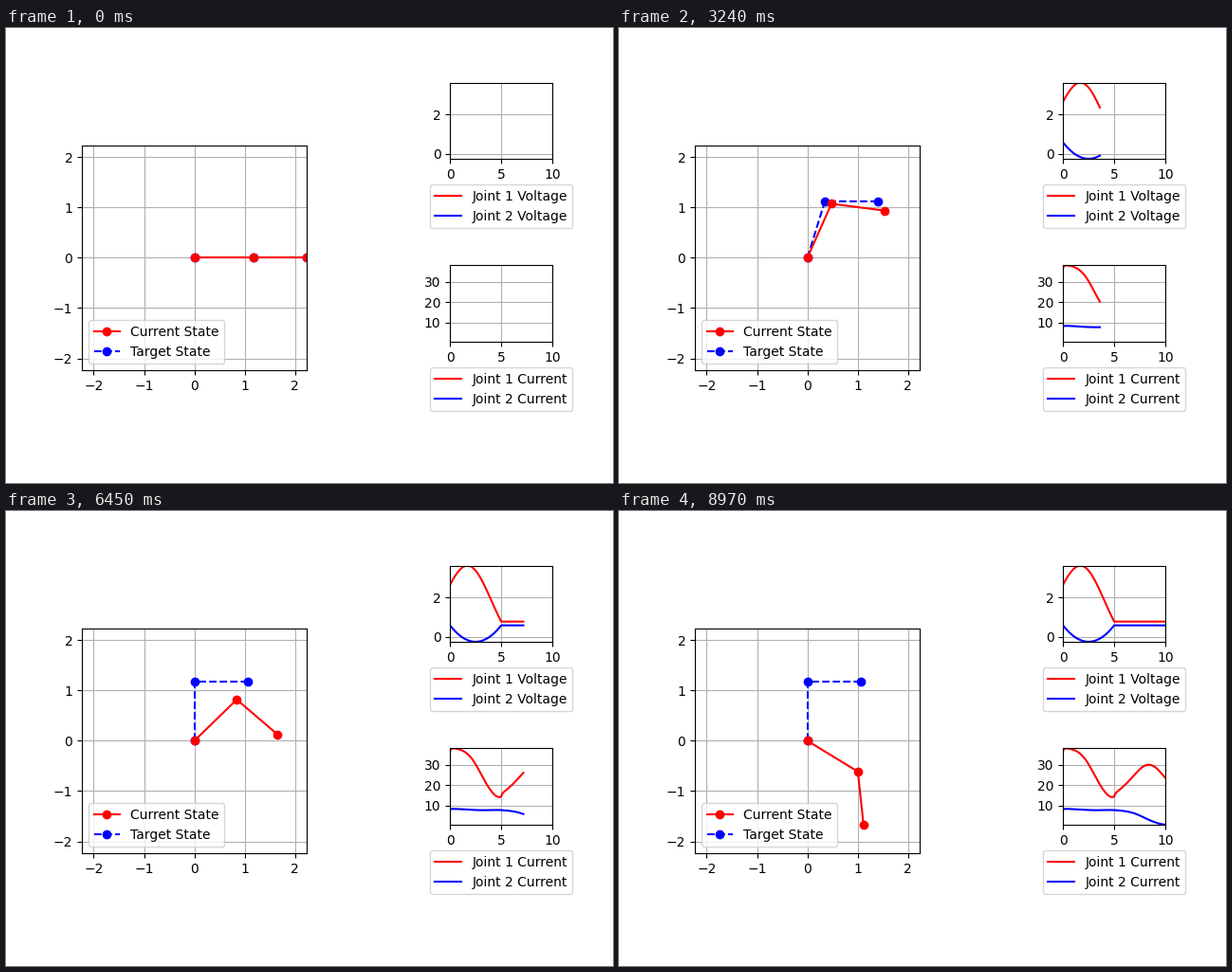
A matplotlib script that plays this animation: 640 by 480 pixels, repeating every 9000 ms.

```python
import numpy as np
import matplotlib.pyplot as plt
from matplotlib.animation import FuncAnimation
from matplotlib.gridspec import GridSpec

FRAMES, INTERVAL = 300, 30
T_END, T_MOVE = 10.0, 5.0
DT = T_END / FRAMES
L1, L2 = 1.175, 1.06
REACH = L1 + L2
R = 0.0725                          # winding resistance
K1, K2 = 2.7, 1.77                  # back-EMF constants
LOAD1, LOAD12, LOAD2 = 25.8, 10.75, 8.1   # gravity loads in amperes
INERTIA, COUPLING = 3.5, 1.0

t = np.arange(FRAMES) * DT

# Reference: cubic quarter turn of joint 1, joint 2 keeps link 2 level
s = np.clip(t / T_MOVE, 0, 1)
ref = np.pi / 2 * (3 * s ** 2 - 2 * s ** 3)
ref_rate = np.pi / 2 * 6 * s * (1 - s) / T_MOVE


def load(a, b):
    """Currents that hold links at absolute angles a and b."""
    return LOAD1 * np.cos(a) + LOAD12 * np.cos(b), LOAD2 * np.cos(b)


# Feed-forward voltages: gravity plus back-EMF
hold1, hold2 = load(ref, 0)
volt1 = R * hold1 + K1 * ref_rate
volt2 = R * hold2 - K2 * ref_rate


def hermite(x, xk, yk, slope):
    """Cubic through the knots (xk, yk) with given slopes."""
    i = np.clip(np.searchsorted(xk, x, side="right") - 1, 0, len(xk) - 2)
    h = xk[i + 1] - xk[i]
    u = (x - xk[i]) / h
    step = u * u * (3 - 2 * u)
    bend = u * (1 - u) * ((1 - u) * slope[i] - u * slope[i + 1])
    return yk[i] + step * (yk[i + 1] - yk[i]) + h * bend


# Actual motion: a few key poses, speeds given by the motor equation
when = np.array([0, 2.267, 3.6, 5, 7.167, 8.833, 9.967])
pose1 = np.radians([0, 34.8, 66, 77, 44.2, -2.4, -31.4])
pose2 = np.radians([0, -4.4, -7.3, -12.7, -40.6, -72.3, -83.9])
need1, need2 = load(pose1, pose2)
speed1 = (np.interp(when, t, volt1) - R * need1) / K1
speed2 = speed1 + (np.interp(when, t, volt2) - R * need2) / K2
link1 = hermite(t, when, pose1, speed1)
link2 = hermite(t, when, pose2, speed2)


def motor(volt, need):
    """Current, speed and acceleration of a motor lagging behind its load."""
    lag = INERTIA * R / K1
    steady = (volt - R * need) / K1
    speed = np.zeros_like(volt)
    for i in range(1, len(volt)):
        gain = 1 - np.exp(-DT / lag)
        speed[i] = speed[i - 1] + gain * (steady[i - 1] - speed[i - 1])
    return (volt - K1 * speed) / R, speed, (steady - speed) / lag


need1, need2 = load(link1, link2)
amp1, speed, accel = motor(volt1, need1)
bend = link1 - link2
amp2 = need2 + COUPLING * (np.cos(bend) * accel - np.sin(bend) * speed ** 2)


def arm(a, b):
    """Joint positions for absolute link angles a and b."""
    x, y = L1 * np.cos(a), L1 * np.sin(a)
    return [0, x, x + L2 * np.cos(b)], [0, y, y + L2 * np.sin(b)]


fig = plt.figure(figsize=(6.4, 4.8), dpi=100)
grid = GridSpec(4, 4, figure=fig)

ax = fig.add_subplot(grid[:, :2])
ax.set(xlim=(-REACH, REACH), ylim=(-REACH, REACH), aspect="equal",
       xticks=range(-2, 3), yticks=range(-2, 3))
ax.grid()
current, = ax.plot([], [], "ro-", label="Current State", zorder=2.2)
target, = ax.plot([], [], "bo--", label="Target State", zorder=2.1)
ax.legend(loc="lower left")


def chart(cell, name, one, two, ticks):
    axis = fig.add_subplot(cell)
    axis.set(xlim=(0, T_END), ylim=(min(one.min(), two.min()),
                                    max(one.max(), two.max())),
             xticks=(0, 5, 10), yticks=ticks)
    axis.grid()
    lines = [axis.plot([], [], c, label=f"Joint {n} {name}")[0]
             for n, c in ((1, "r"), (2, "b"))]
    axis.legend(loc="lower center", bbox_to_anchor=(0.5, -1))
    return list(zip(lines, (one, two)))


curves = (chart(grid[0, 3], "Voltage", volt1, volt2, (0, 2))
          + chart(grid[2, 3], "Current", amp1, amp2, (10, 20, 30)))


def update(i):
    current.set_data(*arm(link1[i], link2[i]))
    target.set_data(*arm(ref[i], 0))
    for line, data in curves:
        line.set_data(t[:i + 1], data[:i + 1])
    return [current, target] + [line for line, _ in curves]


anim = FuncAnimation(fig, update, frames=FRAMES, interval=INTERVAL,
                     repeat=True, repeat_delay=0)
plt.show()
```
